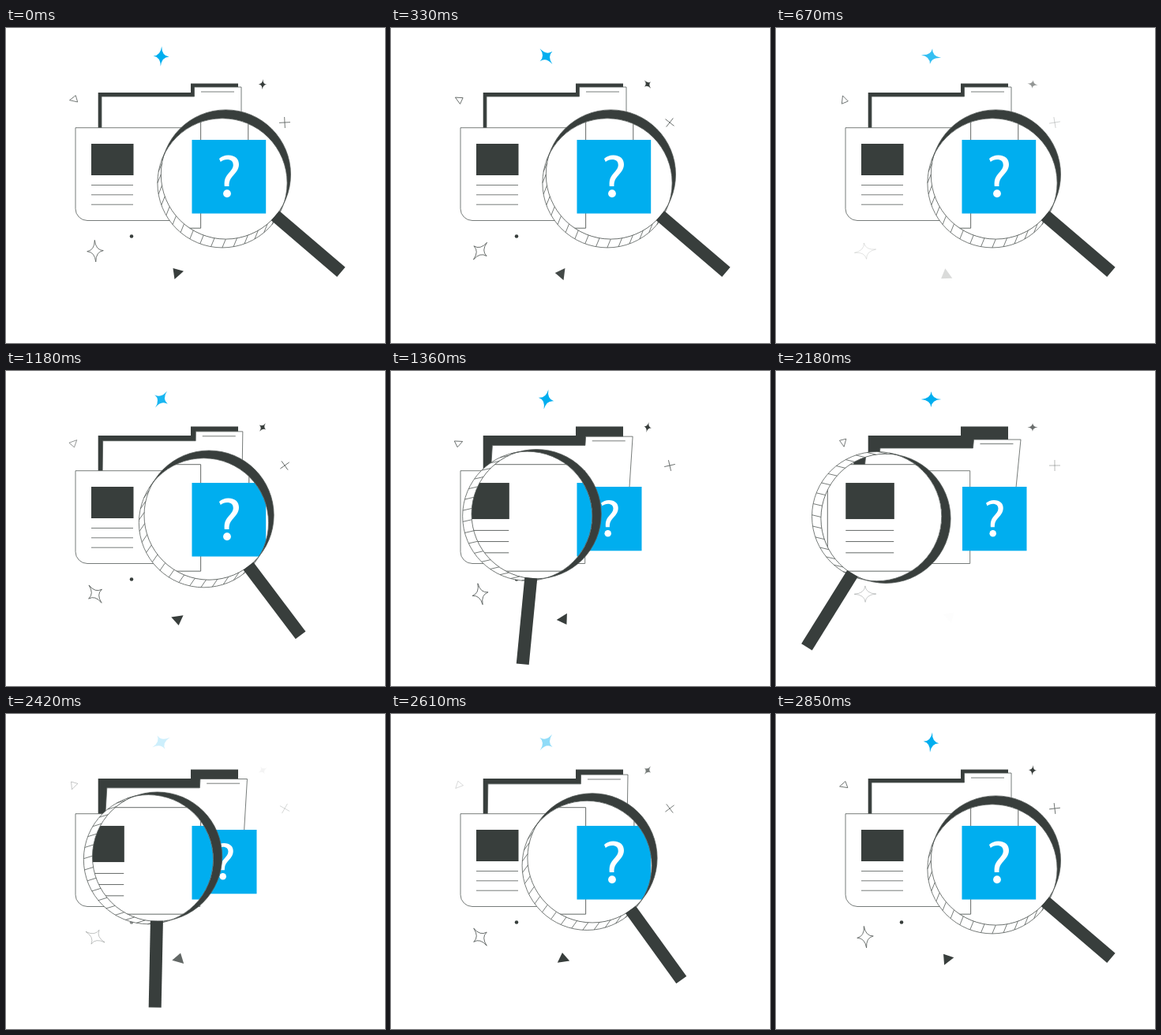
Write an HTML page with a canvas that moves like this. It is 480 px wide and 400 px high and loops after 2.88 s.

```html
<!DOCTYPE html>
<html lang="en">
<head>
<meta charset="utf-8">
<title>Search</title>
<style>
  html, body { margin: 0; width: 100%; height: 100%; overflow: hidden; background: #fff; }
  canvas { display: block; width: 480px; height: 400px; }
</style>
</head>
<body>
<canvas id="stage" width="480" height="400"></canvas>
<script>
const ctx = document.getElementById('stage').getContext('2d');
const LOOP = 2880, TAU = Math.PI * 2, RAD = Math.PI / 180;
const DARK = '#383e3c', LINE = '#555b59', BLUE = '#00aeef';
const RADIUS = 82.1, ZOOM = 1.15;

// Question mark sign, centred on 0,0
const hook = new Path2D('M-13-23C-10-26-6-27.5-1.5-27.5C7.5-27.5 12-22.5 12-16' +
  'C12-10 9-6.5 5.5-2.5C1 2.5-.5 5-.5 12L-6.2 12C-6.8 5-5.5 .5-1.5-4' +
  'C2-8 4.8-11 4.8-15C4.8-19.5 2-22-3-22C-6-22-9-21-11.2-19Z');

const lerp = (a, b, p) => a + (b - a) * p;
const clamp = v => Math.min(1, Math.max(0, v));

// Cubic ease (.33, 0, .45, 1)
function ease(u) {
  if (u <= 0) return 0;
  if (u >= 1) return 1;
  let lo = 0, hi = 1;
  for (let i = 0; i < 24; i++) {
    const s = (lo + hi) / 2, r = 1 - s;
    const x = 3 * r * r * s * 0.33 + 3 * r * s * s * 0.45 + s * s * s;
    if (x < u) lo = s; else hi = s;
  }
  return lo * lo * (3 - 2 * lo);
}

// 0 = glass on the right, 1 = glass on the left
const travel = t => ease((t - 1055) / 584) - ease((t - 2197) / 640);

// Opacity dips twice per loop
function twinkle(t, low) {
  const dip = at => clamp(1 - Math.abs(t - at) / 300);
  return 1 - Math.max(dip(low), dip(low - 1570));
}

function trace(points, close) {
  ctx.beginPath();
  points.forEach(([x, y], i) => i ? ctx.lineTo(x, y) : ctx.moveTo(x, y));
  if (close) ctx.closePath();
}

function segment(x1, y1, x2, y2) {
  trace([[x1, y1], [x2, y2]]);
  ctx.stroke();
}

function circle(c) {
  ctx.beginPath();
  ctx.arc(c.x, c.y, RADIUS, 0, TAU);
}

function dot(x, y, r) {
  ctx.beginPath();
  ctx.arc(x, y, r, 0, TAU);
  ctx.fill();
}

function star(w, h) {
  const k = 0.07;
  ctx.beginPath();
  ctx.moveTo(0, -h);
  ctx.quadraticCurveTo(w * k, -h * k, w, 0);
  ctx.quadraticCurveTo(w * k, h * k, 0, h);
  ctx.quadraticCurveTo(-w * k, h * k, -w, 0);
  ctx.quadraticCurveTo(-w * k, -h * k, 0, -h);
  ctx.closePath();
}

const sparks = [
  { x: 196.5, y: 36, spin: -1, low: 2480, draw() {
    ctx.fillStyle = BLUE; star(10, 12.8); ctx.fill();
  } },
  { x: 325, y: 71.5, spin: -1, low: 2405, draw() {
    star(5.2, 6.6); ctx.fill();
  } },
  { x: 353, y: 120, spin: 1, low: 2340, draw() {
    segment(-7, 0, 7, 0); segment(0, -7, 0, 7);
  } },
  { x: 113, y: 283.2, spin: 1, low: 2300, draw() {
    star(10.3, 13.8); ctx.stroke();
  } },
  { x: 85.7, y: 91, spin: 1, low: 2535, draw() {
    trace([[-5.2, 0.4], [2.8, -5.2], [4.8, 3.2]], true); ctx.stroke();
  } },
  { x: 217.7, y: 313, spin: -1, low: 2185, draw() {
    trace([[-6.6, -7.6], [7.1, -4.6], [-3.9, 6.3]], true); ctx.fill();
  } },
  { x: 159, y: 264.5, spin: 0, low: 2240, draw() {
    dot(0, 0, 2.3);
  } }
];

function drawSparks(t) {
  for (const s of sparks) {
    ctx.save();
    ctx.globalAlpha = twinkle(t, s.low);
    ctx.translate(s.x, s.y);
    ctx.rotate(s.spin * (t - 25) / LOOP * TAU);
    ctx.fillStyle = DARK;
    s.draw();
    ctx.restore();
  }
}

function drawFolder(p) {
  // Leaning sheet: hinged at y = 209
  const lean = ([x, y]) => {
    const up = 209 - y;
    return [x + up / 134 * 12 * p, 209 - up * (1 - 0.09 * p)];
  };

  ctx.fillStyle = DARK;
  trace([[116.7, 82], [234, 82], [234, 70.5], [294, 70.5], [294, 140], [116.7, 140]], true);
  ctx.fill();

  ctx.fillStyle = '#fff';
  trace([[121, 209], [121, 87], [238.5, 87], [238.5, 75], [298, 75], [298, 209]].map(lean), true);
  ctx.fill();
  ctx.stroke();
  trace([[247, 81], [289, 81]].map(lean));
  ctx.stroke();

  ctx.beginPath();
  ctx.moveTo(88, 126.7);
  ctx.lineTo(245.7, 126.7);
  ctx.lineTo(245.7, 244.5);
  ctx.arcTo(88, 244.5, 88, 126.7, 15);
  ctx.closePath();
  ctx.fill();
  ctx.stroke();

  ctx.fillStyle = DARK;
  ctx.fillRect(108, 147, 53.5, 40);
  for (const y of [199.5, 211.8, 224.2]) segment(108, y, 161, y);

  ctx.fillStyle = BLUE;
  ctx.fillRect(236, 147, 81.5, 81.3);
  ctx.save();
  ctx.translate(277.3, 187.8);
  ctx.scale(1 / ZOOM, 1 / ZOOM);
  ctx.fillStyle = '#fff';
  ctx.fill(hook);
  dot(-3, 21.3, 4.9);
  ctx.restore();
}

function drawGlass(p) {
  const angle = (40.6 + 81.2 * p) * RAD;
  const tilt = angle + 71.5 * RAD;
  const front = { x: lerp(278.4, 139, p), y: lerp(186, 187.3, p) - 24 * p * (1 - p) };
  const dx = 11.7 * Math.cos(tilt), dy = 11.7 * Math.sin(tilt);
  const back = { x: front.x + dx, y: front.y + dy };

  ctx.fillStyle = '#fff';
  circle(back);
  ctx.fill();
  ctx.fillStyle = DARK;
  circle(front);
  ctx.fill();

  // Enlarged view through the lens
  ctx.save();
  circle(front);
  ctx.clip();
  circle(back);
  ctx.clip();
  ctx.fillStyle = '#fff';
  ctx.fillRect(0, 0, 480, 400);
  ctx.translate(239.5, 180);
  ctx.scale(ZOOM, ZOOM);
  ctx.translate(-239.5, -180);
  drawFolder(p);
  ctx.restore();

  for (let a = -82; a <= 88; a += 10) {
    const x = front.x + RADIUS * Math.cos(tilt + a * RAD);
    const y = front.y + RADIUS * Math.sin(tilt + a * RAD);
    segment(x, y, x + dx, y + dy);
  }
  circle(back);
  ctx.stroke();
  circle(front);
  ctx.stroke();

  ctx.save();
  ctx.translate(front.x, front.y);
  ctx.rotate(angle);
  ctx.fillStyle = DARK;
  ctx.fillRect(81.5, -9, 110, 16);
  ctx.restore();
}

function render(t) {
  const p = travel(t);
  ctx.fillStyle = '#fff';
  ctx.fillRect(0, 0, 480, 400);
  ctx.strokeStyle = LINE;
  ctx.lineWidth = 0.8;
  drawFolder(p);
  drawSparks(t);
  drawGlass(p);
}

const start = performance.now();
function tick() {
  render((performance.now() - start) % LOOP);
  requestAnimationFrame(tick);
}
tick();
</script>
</body>
</html>
```
